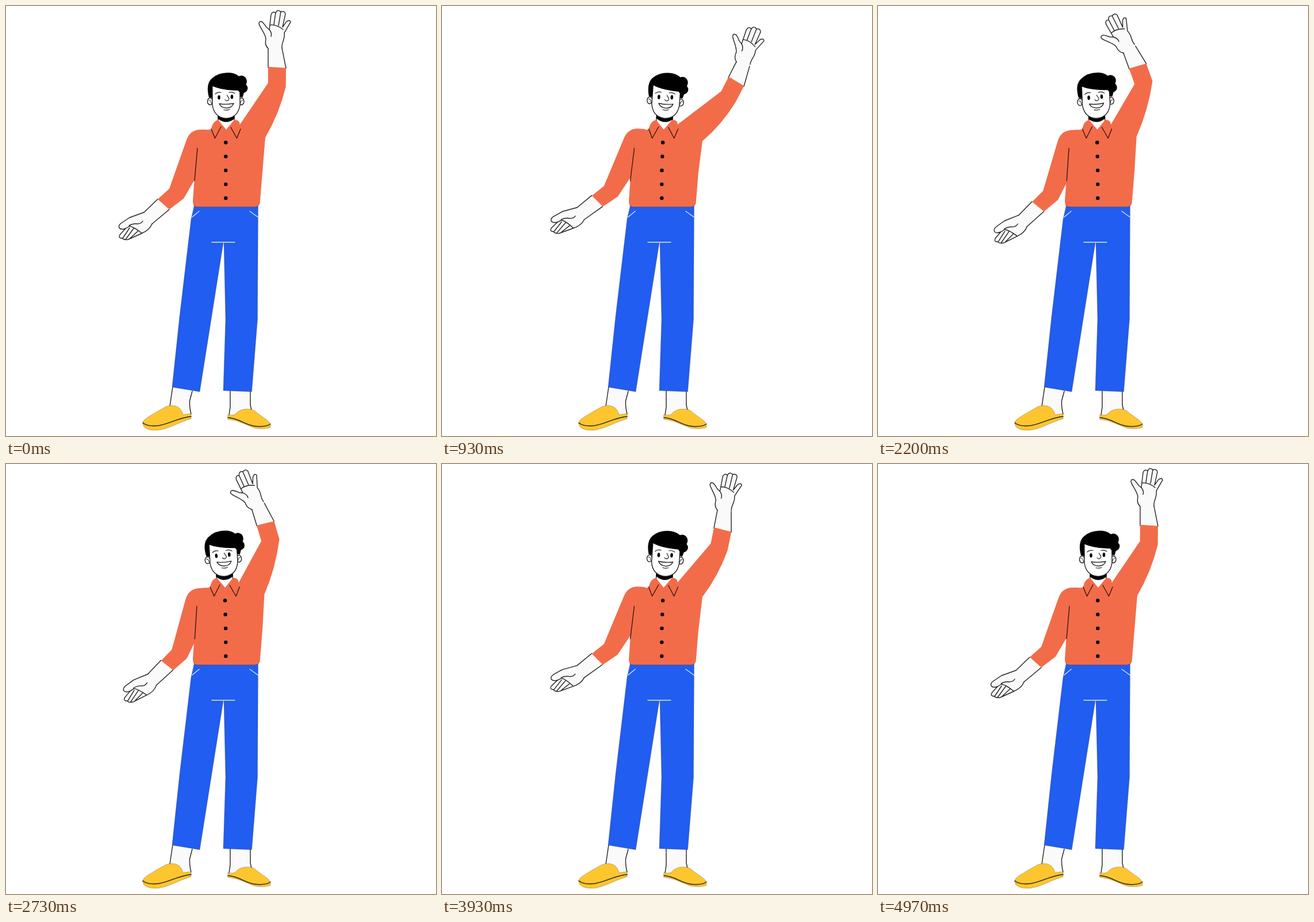
An HTML page with a canvas that plays this animation: 748x748 px, repeating every 5010 ms.

```html
<!DOCTYPE html>
<html lang="en">
<head>
<meta charset="utf-8">
<title>Waving man</title>
<style>
html, body { margin: 0; width: 100%; height: 100%; overflow: hidden; background: #fff; }
canvas { display: block; width: 100vw; height: 100vh; }
</style>
</head>
<body>
<canvas id="stage" width="748" height="748"></canvas>
<script>
const ctx = document.getElementById('stage').getContext('2d');
const LOOP = 5010, RAD = Math.PI / 180;
const SHIRT = '#f26c4a', BLUE = '#205df0', YELLOW = '#fdc62f';
const SKIN = '#fafafa', INK = '#222', SEAM = '#3a1710', EDGE = 'rgba(70, 50, 50, 0.4)';

// time, sway, left arm, upper arm, forearm and hand angles
const KEYS = [
  [0, 0, 0, 27.6, 0, 0],
  [570, 5, -3, 36.5, 12, 5],
  [930, 9.5, -7, 48, 27, 12],
  [1140, 10.5, -8, 49.5, 31, 16],
  [1615, 6.5, -6, 47, 17, 4],
  [1800, 3, -3, 41.2, -4.5, -13],
  [2170, -5, 6, 22, -20, -36],
  [2450, -8, 10, 19, -21, -38],
  [2730, -6.5, 9, 20.1, -17, -33],
  [3000, 0, 4, 26.5, -6, -18],
  [3330, 7.5, -4, 35.5, 8.5, -3],
  [3760, 9.5, -7.2, 36, 12.5, 6],
  [3930, 9, -7, 35.3, 11, 4],
  [4300, 5.5, -4.5, 32, 5, 1],
  [4830, 0.4, -0.4, 27.6, 0, 0],
  [4970, 0, 0, 27.6, 0, 0]
];

function secant(i, c) {
  return (KEYS[i + 1][c] - KEYS[i][c]) / (KEYS[i + 1][0] - KEYS[i][0]);
}

function slope(i, c) {
  if (i === 0 || i === KEYS.length - 1) return 0;
  const a = secant(i - 1, c), b = secant(i, c);
  return a * b <= 0 ? 0 : 2 * a * b / (a + b);
}

// Smooth curve through the keys that never overshoots them
function track(t, c) {
  let i = 0;
  while (i < KEYS.length - 2 && t >= KEYS[i + 1][0]) i++;
  const a = KEYS[i], b = KEYS[i + 1], span = b[0] - a[0];
  const p = Math.min(1, (t - a[0]) / span), q = 1 - p;
  return a[c] * (1 + 2 * p) * q * q + b[c] * (3 - 2 * p) * p * p +
    span * p * q * (slope(i, c) * q - slope(i + 1, c) * p);
}

function fill(d, color) {
  ctx.fillStyle = color;
  ctx.fill(new Path2D(d));
}

function line(d, color = INK, width = 1.4) {
  ctx.strokeStyle = color;
  ctx.lineWidth = width;
  ctx.stroke(new Path2D(d));
}

function shape(d, color, edge = INK, width = 1.4) {
  fill(d, color);
  line(d, edge, width);
}

function oval(x, y, rx, ry, color, outlined) {
  ctx.beginPath();
  ctx.ellipse(x, y, rx, ry, 0, 0, 7);
  ctx.fillStyle = color;
  ctx.fill();
  if (outlined) {
    ctx.strokeStyle = INK;
    ctx.lineWidth = 1.4;
    ctx.stroke();
  }
}

function spin(x, y, angle) {
  ctx.translate(x, y);
  ctx.rotate(angle);
  ctx.translate(-x, -y);
}

function group(draw) {
  ctx.save();
  draw();
  ctx.restore();
}

function drawLegs() {
  fill('M290 660L285 698L308 712L321 709L319 688L324 668Z', SKIN);
  line('M290 662L285 696M324 670L319.5 687Q319 698 322 710');
  fill('M390 665V698L388 712H427L425 695V668Z', SKIN);
  line('M390 668V698L388 711M425 670V694L427 703');

  shape('M238 727Q237 722 243 718C256 709 266 704 278 697Q292 692 301 699Q306 703 308 711' +
    'L322 709V718C300 724 285 735 264 738Q240 739 238 727Z', YELLOW, EDGE, 0.8);
  line('M238 725Q246 732 265 730C285 727 300 716 322 714');
  shape('M386 711Q394 713 399 710Q406 701 420 701Q431 701 437 708L455 721Q461 726 460 733' +
    'Q448 737 432 734C416 728 404 721 386 719Z', YELLOW, EDGE, 0.8);
  line('M386 716C406 717 415 729 434 731Q452 733 460 727');

  shape('M328 345H438.5L437.500 545L427.5 671L378 669L382 545L379 411L378 412L337 671' +
    'L289 663L302 540L322 371Z', BLUE, EDGE, 0.8);
  line('M358 411H398M336 357L324 367M424 357L438 367', '#dce6ff');
}

function drawLeftArm(sway, lift) {
  group(() => {
    ctx.translate(0.25 * sway, -0.2 * sway);
    spin(335, 235, -0.008 * lift);
    group(() => {
      spin(290, 330, 0.003 * Math.abs(lift));
      fill('M272 328L240 359L254 379L294 345Z', SKIN);
      shape('M254 379Q250 390 235 396L213 406Q206 408 202 404Q195 404 198 398L208 387' +
        'Q200 390 197 386Q195 382 200 378L215 368L240 359', SKIN);
      line('M264 336L240 359M284 354L254 379');
      line('M215 386L203 404M222 387L208 406M230 391L216 404M208 387L215 383Q222 384 236 395');
      line('M214 382Q222 378 228 379Q235 379 238 374');
    });
    fill('M337 215Q320 216 314 233L284 318L264 336L284 354L309 335L327 304L338 290L350 215Z', SHIRT);
  });
}

function drawHand() {
  shape('M456 74C450 68 451 62 452 57C451 48 442 38 440 31Q440 25 446 28Q450 32 453 37' +
    'L458 41L461 15Q464 8 469 12Q472 5 478 10Q485 8 486 14L481 37L488 27' +
    'Q494 23 495 28L484 47C486 58 479 63 480 73', SKIN);
  line('M469 12L466 32M478 10L474 34M459.500 33Q471 32 482 41M458 41Q463 47 461 53');
}

function drawRightArm(lean, upper, fore, hand) {
  const ex = 427 + 95.5 * Math.sin(upper * RAD);
  const ey = 222 - 95.5 * Math.cos(upper * RAD);
  const cos = Math.cos(fore * RAD), sin = Math.sin(fore * RAD);
  const at = (x, y) => [ex + x * cos - y * sin, ey + x * sin + y * cos];

  group(() => {
    ctx.translate(ex, ey);
    ctx.rotate(fore * RAD);
    fill('M-15 -25V-64H9L16 -25Z', SKIN);
    line('M-15.200 -30V-63.500M15.800 -29L8.800 -64.500');
    ctx.translate(-3.2, -63.9);
    ctx.rotate(hand * RAD - fore * RAD);
    ctx.translate(-468, -73.5);
    drawHand();
  });

  const pitY = 229 + 0.3 * (upper - 27.6);
  const pitX = 451 + lean * (290 - pitY);
  const outer = at(15.5, 3);
  const dx = pitX - outer[0], dy = pitY - outer[1], len = Math.hypot(dx, dy);
  const bulge = [(pitX + outer[0]) / 2 + 7 * dy / len, (pitY + outer[1]) / 2 - 7 * dx / len];
  ctx.beginPath();
  ctx.moveTo(407 + lean * 84, 206);
  ctx.lineTo(...at(-15.5, -3));
  ctx.lineTo(...at(-15.3, -31.5));
  ctx.lineTo(...at(15.8, -29.5));
  ctx.lineTo(...outer);
  ctx.quadraticCurveTo(...bulge, pitX, pitY);
  ctx.lineTo(446, 290);
  ctx.lineTo(400, 270);
  ctx.fillStyle = SHIRT;
  ctx.fill();
}

function drawTorso(lean) {
  fill('M328.500 289H446L442 339Q441 349.500 433 349.500H333Q325 349 325 340Z', SHIRT);
  line('M326 345Q328 349.500 333 349.500H433Q440 349.500 441.500 342', EDGE, 1);
  group(() => {
    ctx.transform(1, 0, -lean, 1, 290 * lean, 0);
    fill('M328 291L333 250L334 217L364 214L383 215L402 206H408L440 235L446 291Z', SHIRT);
  });
}

function drawHead(sway) {
  group(() => {
    ctx.translate(0.3 * sway, 0);
    spin(383, 212, 0.45 * RAD * sway);
    fill('M369 186H397V201L383 215L369 201Z', '#fff');
    line('M369 188V201M397 188V201');
    fill('M368.500 184H397.500V196Q383 207.500 368.500 196Z', '#000');
    oval(355, 166, 4.500, 6, '#fff', true);
    oval(409.500, 166, 4.500, 6, '#fff', true);
    shape('M359 138V172Q362 194 383 195.500Q404 194 407 172V140', '#fff');
    line('M353 164Q357 163 357 169M412 164Q408 164 408 169', INK, 1);
    oval(409.500, 131, 9.500, 10, '#000');
    oval(411.500, 143, 9, 8.500, '#000');
    fill('M359 160L353 159Q347 136 358 126Q370 115 389 116Q400 117 406 123L418 137L411.500 159' +
      'L407 158L406.500 147Q376 147 358.500 139Z', '#000');
    oval(370.500, 159, 2.300, 3.800, '#000');
    oval(393, 158, 2.300, 3.800, '#000');
    line('M364 153Q368 149 374 150.500M388 150.500Q393 148.500 398 152', INK, 1.2);
    line('M384.500 155C386 159 390 161 386.500 164Q383 166 381 163', INK, 1.2);
    shape('M371 170Q383 172 396 169.500Q393 177.500 383.500 177.500Q374 177 371 170Z', '#fff');
    line('M379 180.500Q384 182 389 180', INK, 1.2);
  });
}

function drawDetails(lean) {
  group(() => {
    ctx.transform(1, 0, -lean, 1, 290 * lean, 0);
    fill('M369 198Q360 200 357 213L363.500 230L383 215Z', SHIRT);
    fill('M397 198Q407 198 406.500 206L409 213L401.500 230L383 215Z', SHIRT);
    line('M357 214L363.500 230L374 210M391 211L401.500 230L408 214M333 247.500L328 304', SEAM);
  });
  for (let i = 0; i < 5; i++) {
    const y = 237.5 + 24.2 * i;
    oval(382.3 + lean * Math.max(0, 290 - y), y, 3.2, 3.2, '#000');
  }
}

function render(t) {
  const [sway, lift, upper, fore, hand] = [1, 2, 3, 4, 5].map(c => track(t, c));
  const lean = 0.00375 * sway;
  ctx.fillStyle = '#fff';
  ctx.fillRect(0, 0, 748, 748);
  ctx.lineCap = ctx.lineJoin = 'round';
  drawLegs();
  drawLeftArm(sway, lift);
  drawRightArm(lean, upper, fore, hand);
  drawTorso(lean);
  drawHead(sway);
  drawDetails(lean);
}

const start = performance.now();
function tick() {
  render((performance.now() - start) % LOOP);
  requestAnimationFrame(tick);
}
tick();
</script>
</body>
</html>
```
